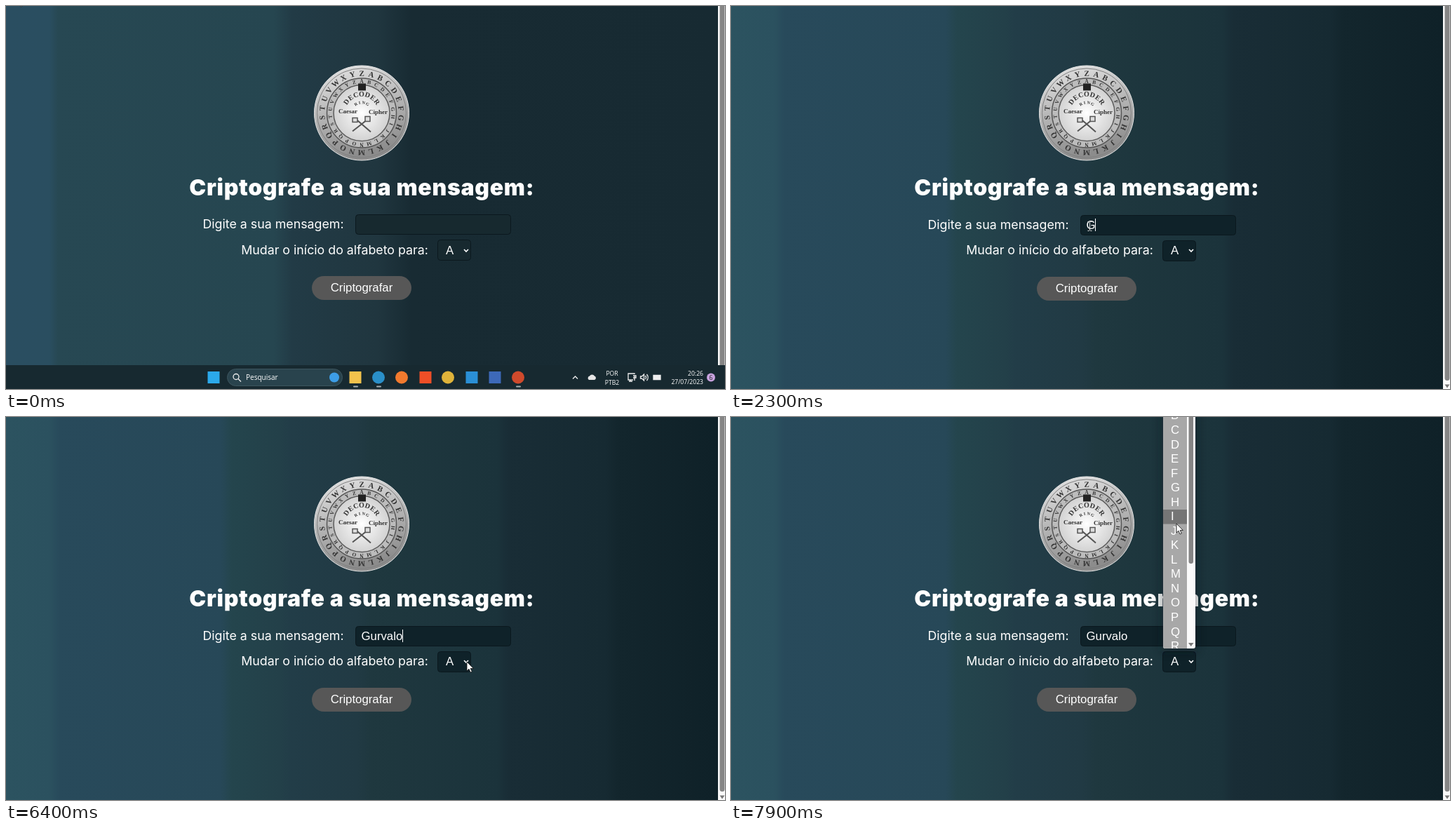
Write an HTML page that moves like this. It is 1025 px wide and 546 px high and loops after 8000 ms.

```html
<!DOCTYPE html>
<html lang="pt">
<head>
<meta charset="utf-8">
<title>Criptografe a sua mensagem</title>
<style>
  html, body { margin: 0; width: 100%; height: 100%; overflow: hidden; background: #172a33; }
  svg { display: block; width: 1025px; height: 546px; }
  text { fill: #fff; white-space: pre; }
  .title { font: 900 32px Inter, sans-serif; letter-spacing: .7px; text-anchor: middle; }
  .label { font: 17.8px Inter, sans-serif; text-anchor: middle; }
  .field { font: 16.8px "Liberation Sans", Arial, sans-serif; }
  .box { fill: #0f2229; stroke: #0b181e; }
  .early .box { fill: #17292f; }
  .bar text { font: 8.6px "Open Sans", sans-serif; }
  #coin text { fill: #333; font-family: "Liberation Serif", serif; font-weight: bold; text-anchor: middle; }
</style>
</head>
<body>
<svg viewBox="0 0 1025 546">
  <defs>
    <linearGradient id="early" gradientUnits="userSpaceOnUse" x2="1015"></linearGradient>
    <linearGradient id="late" gradientUnits="userSpaceOnUse" x2="1015"></linearGradient>
    <linearGradient id="rim" x2=".25" y2="1">
      <stop stop-color="#e6e6e6"/><stop offset=".55" stop-color="#b4b4b4"/><stop offset="1" stop-color="#8c8c8c"/>
    </linearGradient>
    <radialGradient id="face">
      <stop stop-color="#fff"/><stop offset=".4" stop-color="#ececec"/><stop offset="1" stop-color="#d2d2d2"/>
    </radialGradient>
    <filter id="blur" x="-50%" y="-20%" width="200%" height="140%"><feGaussianBlur stdDeviation="7"/></filter>
  </defs>

  <rect id="back" width="1015" height="546"/>
  <rect x="1015" width="10" height="546" fill="#fafafa"/>
  <rect x="1017.500" y="-10" width="7" height="544" rx="3.500" fill="#858585"/>
  <path d="M1017.500 539.500h7l-3.500 5z" fill="#777"/>

  <g id="coin" transform="translate(507 152.500)">
    <circle r="67.500" fill="url(#rim)" stroke="#e8e8e8"/>
    <circle r="63.500" fill="none" stroke="#808080"/>
    <circle r="49.500" fill="#bcbcbc" stroke="#555" stroke-width="1.500"/>
    <circle r="40" fill="url(#face)" stroke="#5c5c5c" stroke-width="1.500"/>
    <rect x="-5" y="-42" width="11" height="10" fill="#222"/>
    <path d="M-13 26L10 8M13 27L-9 8" stroke="#555" stroke-width="2"/>
    <path d="M-13 7h7v6h-7zM5 5h7v7h-7z" fill="#ddd" stroke="#555" stroke-width="1.500"/>
    <text x="-19.500" y="0" font-size="9">Caesar</text>
    <text x="23.500" y="1" font-size="9">Cipher</text>
  </g>

  <text class="title" x="507.300" y="270">Criptografe a sua mensagem:</text>
  <text class="label" x="468.500" y="354">Mudar o início do alfabeto para:</text>

  <g id="form">
    <text class="label" x="381" y="317">Digite a sua mensagem:</text>
    <rect class="box" x="498.500" y="297.500" width="221" height="28" rx="4"/>
    <rect class="box" x="615.500" y="333.500" width="47" height="29" rx="4"/>
    <rect x="436" y="385" width="142" height="34" rx="17" fill="#575757"/>
    <text class="field" x="507" y="407" text-anchor="middle">Criptografar</text>
    <text class="field" id="msg" x="506.500" y="316.500"></text>
    <rect id="caret" y="302" width="1" height="18" fill="#fff"/>
  </g>
  <text class="field" x="627" y="354">A</text>
  <path d="M653 347l3 3 3-3" fill="none" stroke="#fff" stroke-width="1.600"/>

  <g id="popup">
    <rect x="614" y="-30" width="50" height="364" fill="#07141a" opacity=".45" filter="url(#blur)"/>
    <rect x="616" y="-20" width="46" height="350" rx="3" fill="#fafafa"/>
    <path d="M616 0h34v330h-31q-3 0-3-3z" fill="#a8a8a8"/>
    <rect id="hover" x="616" width="34" height="20.540" fill="#757575"/>
    <svg width="1025" height="330" id="options"></svg>
    <rect x="652.500" y="-20" width="6.500" height="229" rx="3" fill="#858585"/>
    <path d="M652 322h7.500l-3.750 5z" fill="#777"/>
  </g>

  <g class="bar" id="bar">
    <rect y="512" width="1025" height="34" fill="#172930"/>
    <rect x="315.500" y="517.500" width="164" height="24" rx="12" fill="#29434d" stroke="#3d555e"/>
    <g fill="none" stroke="#eee" stroke-width="1.300">
      <circle cx="328" cy="528.500" r="4"/><path d="M331 531.500l4 4M808 531.500l3.500-3.500 3.500 3.500"/>
      <path d="M896 525v-1h-9v9h7m-4 0v2m-2 0h5M896 527v7m-2-7h4v3h-4"/>
      <path d="M904.500 528h2l3-3v9l-3-3h-2zM911.500 527q2 2.500 0 5M913.500 525q3.500 4.500 0 9"/>
      <path d="M923 526.500h10v6h-10z" fill="#eee"/>
    </g>
    <path d="M831 533a3 3 0 0 1 1-5.500a4 4 0 0 1 7 0a2.900 2.900 0 0 1 0 5.500z" fill="#e6e6e6"/>
    <text x="342" y="533" style="font-size:10px">Pesquisar</text>
    <g text-anchor="middle"><text x="864" y="527">POR</text><text x="864" y="539.500">PTB2</text></g>
    <g text-anchor="end"><text x="994" y="526.500">20:26</text><text x="994" y="538.500">27/07/2023</text></g>
    <circle cx="1005" cy="529.500" r="6" fill="#c8a2de"/>
    <text x="1005" y="532.500" text-anchor="middle" style="fill:#222">6</text>
    <path d="M496 542.500h5M529 542.500h5M728 542.500h5" stroke="#a5adb0" stroke-width="2" stroke-linecap="round"/>
  </g>

  <path id="arrow" d="M0 0v13l3-2.800 2.100 4.800 2.200-1-2.100-4.500h4.100z" fill="#fff" stroke="#111" stroke-width=".8"/>
  <path id="beam" d="M-3-6.500h2l1 1 1-1h2M0-5.500v11M-3 6.500h2l1-1 1 1h2" fill="none" stroke="#ddd"/>
</svg>

<script>
const $ = id => document.getElementById(id);
const ALPHABET = 'ABCDEFGHIJKLMNOPQRSTUVWXYZ';
const ROW = 20.54, LIST_TOP = -32.3;

function add(parent, tag, attrs, text = '') {
  const el = document.createElementNS('http://www.w3.org/2000/svg', tag);
  for (const key in attrs) el.setAttribute(key, attrs[key]);
  el.textContent = text;
  return parent.appendChild(el);
}

function stops(id, list) {
  for (const [x, color] of list) add($(id), 'stop', { offset: x / 1015, 'stop-color': color });
}
stops('early', [[0, '#2a4e61'], [62, '#2a4e60'], [74, '#274853'], [382, '#264650'], [408, '#223b46'],
  [530, '#20363f'], [578, '#182b33'], [1015, '#172a32']]);
stops('late', [[0, '#2c5360'], [62, '#2b515f'], [76, '#284a5b'], [306, '#274858'], [322, '#24454d'],
  [390, '#234049'], [406, '#223d48'], [500, '#213a44'], [520, '#1f383f'], [700, '#1b333b'],
  [716, '#192d36'], [855, '#162a32'], [872, '#13262d'], [1015, '#0f2128']]);

function ring(word, radius, size, from, step) {
  [...word].forEach((c, i) => add($('coin'), 'text',
    { transform: `rotate(${from + i * step})`, y: size * .33 - radius, 'font-size': size }, c));
}
ring(ALPHABET, 56.5, 11, 14, 360 / 26);
ring(ALPHABET, 45, 7.5, 0, 360 / 26);
ring('DECODER', 27, 10, -54, 18);
ring('RING', 15, 6, -33, 22);

[...ALPHABET].slice(0, 18).forEach((c, i) =>
  add($('options'), 'text', { class: 'field', x: 627, y: LIST_TOP + i * ROW + 15.2 }, c));

// taskbar marks: x, colour, round
[[296, '#2ba9ea', 0], [468, '#3d9de6', 1], [498, '#f3c24c', 0], [531, '#2a8fc8', 1], [564, '#f27a2e', 1],
 [598, '#ef4f27', 0], [630, '#dfb33a', 1], [664, '#2a8fd6', 0], [697, '#3d69b8', 0], [730, '#cf4a2c', 1]]
  .forEach(([x, fill, round]) => round
    ? add($('bar'), 'circle', { cx: x, cy: 529.5, r: x === 468 ? 7 : 9, fill })
    : add($('bar'), 'rect', { x: x - 8.5, y: 521, width: 17, height: 17, fill }));

const name = 'Gurvalo', keyTimes = [2300, 2800, 3100, 3400, 3600, 3800, 4100];
const caretTimes = [900, 1600, 2200, 4500, 5000, 5600, 6100, 6500];   // on, off, on, ...
const path = [[0, 16, -14], [100, 22, 4], [500, 300, 190], [900, 511, 314], [4800, 511, 314],
  [5000, 590, 334], [5200, 653, 350], [5400, 500, 326], [5500, 428, 317], [5700, 611, 338],
  [5900, 598, 334], [6000, 598, 334], [6200, 652, 380], [6400, 657, 349], [6600, 657, 349],
  [6900, 631, 31], [7100, 637, 88], [7200, 637, 88], [7300, 637, 83], [7400, 637, 83],
  [7900, 635, 152]];

function mouseAt(t) {
  const i = path.findIndex(p => p[0] >= t);
  if (i < 1) return path[0].slice(1);
  const [a, b] = [path[i - 1], path[i]], k = (t - a[0]) / (b[0] - a[0]);
  return [a[1] + (b[1] - a[1]) * k, a[2] + (b[2] - a[2]) * k];
}

const show = (id, on) => $(id).setAttribute('visibility', on ? 'visible' : 'hidden');
const move = (id, x, y) => $(id).setAttribute('transform', `translate(${x} ${y})`);

function draw(t) {
  const early = t < 900, open = t >= 6500;
  $('back').setAttribute('fill', `url(#${early ? 'early' : 'late'})`);
  $('form').setAttribute('class', early ? 'early' : '');
  move('form', 0, t < 1000 ? 0 : 1);
  show('bar', t < 1000);

  $('msg').textContent = name.slice(0, keyTimes.filter(k => k <= t).length);
  $('caret').setAttribute('x', 506 + Math.round($('msg').getComputedTextLength()));
  show('caret', caretTimes.filter(c => c <= t).length % 2);

  const [x, y] = mouseAt(t);
  const inList = x < 650 && y < 330;
  const row = inList ? Math.floor((y - LIST_TOP) / ROW) : 0;
  show('popup', open);
  $('hover').setAttribute('y', LIST_TOP + row * ROW);

  const typing = !open && x > 498 && x < 720 && y > 298 && y < 326;
  show('arrow', !typing);
  show('beam', typing);
  move('arrow', x, y);
  move('beam', x + .5, y);
}

function frame() {
  draw(Math.floor(performance.now() % 8000 / 100) * 100);
  requestAnimationFrame(frame);
}
frame();
</script>
</body>
</html>
```
